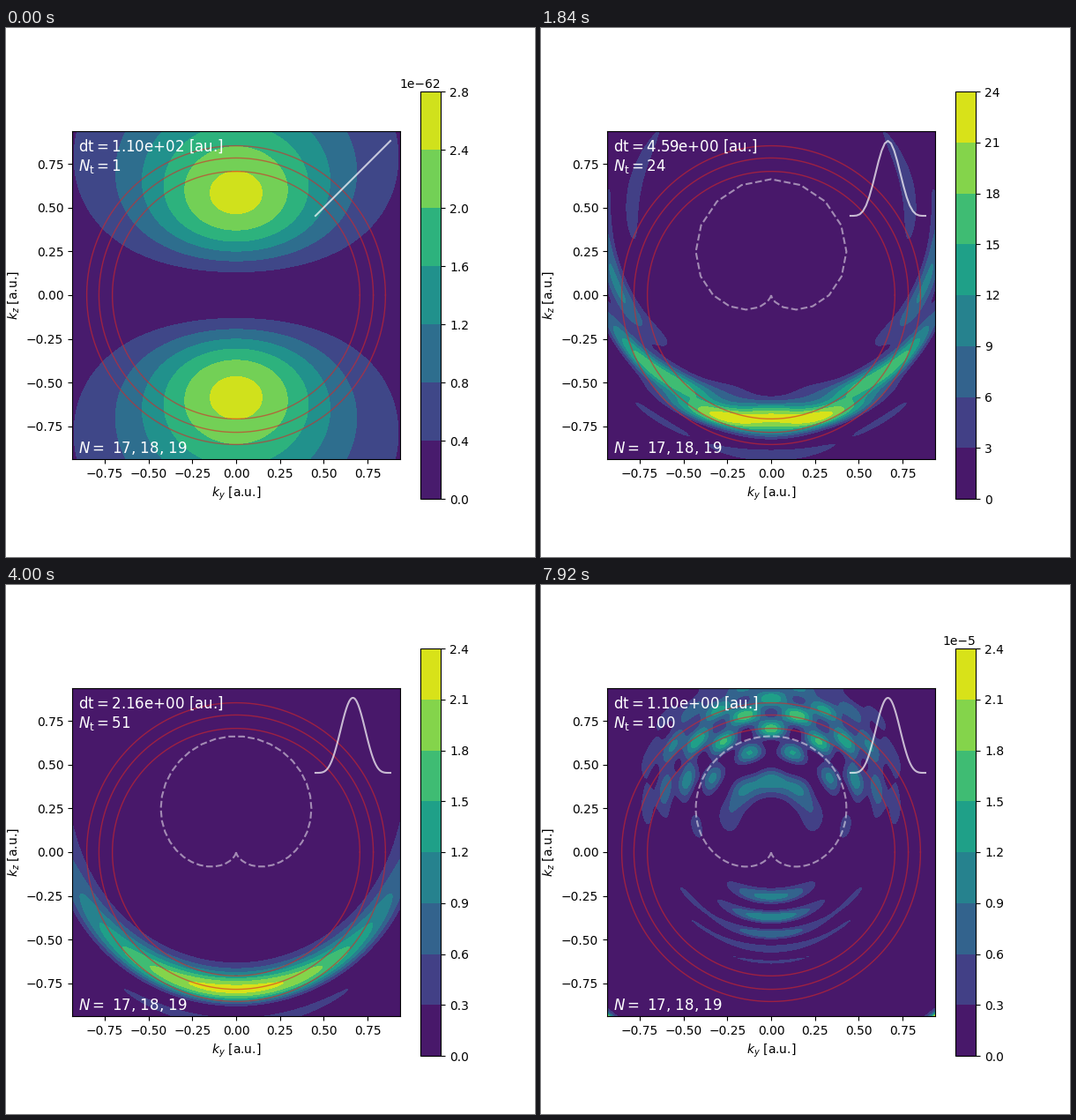
A matplotlib script that plays this animation: 600x600 px, repeating every 8000 ms.

```python
import numpy as np
import matplotlib.pyplot as plt
from matplotlib.animation import FuncAnimation

# Photoelectron momentum map from a one-cycle circular pulse (atomic units),
# integrated in time with a growing number of Simpson intervals.
OMEGA = 0.057
IP = 0.5
A0 = np.sqrt(1e14 / 3.5095e16 / 2) / OMEGA
UP = A0**2 / 2
PERIOD = 2 * np.pi / OMEGA
K_MAX = np.sqrt(2) * A0
ORDERS = (17, 18, 19)
STEPS = 100

k = np.linspace(-K_MAX, K_MAX, 200)
ky, kz = np.meshgrid(k, k)
ground_state = 2 * np.sqrt(2) / np.pi / (ky**2 + kz**2 + 1)**2


def simpson_weights(n):
    """Simpson weights for n intervals, with a three-point end rule if n is odd."""
    if n == 1:
        return np.array([0.5, 0.5])
    w = np.zeros(n + 1)
    last = n - n % 2
    w[:last + 1:2] = 2 / 3
    w[1:last:2] = 4 / 3
    w[[0, last]] = 1 / 3
    if n % 2:
        w[-3:] += [-1 / 12, 2 / 3, 5 / 12]
    return w


def vector_potential(n):
    theta = np.linspace(0, 2 * np.pi, n + 1)
    envelope = np.sin(theta / 2)**2
    return (theta, envelope,
            A0 * envelope * np.sin(theta), A0 * envelope * np.cos(theta))


def momentum_map(n):
    theta, _, ay, az = vector_potential(n)
    t = theta / OMEGA
    sin, cos, sin2 = np.sin(theta), np.cos(theta), np.sin(2 * theta)
    # Time integrals of Ay, Az and A^2
    int_y = A0 / (2 * OMEGA) * (1 - cos - sin**2 / 2)
    int_z = A0 / (2 * OMEGA) * (sin - theta / 2 - sin2 / 4)
    int_sq = A0**2 / (4 * OMEGA) * (1.5 * theta - 2 * sin + sin2 / 4)

    # The phase separates into a ky part, a kz part and a common part
    kinetic = np.outer(k**2 / 2, t)
    wave_y = np.exp(1j * (kinetic + np.outer(k, int_y)))
    wave_z = np.exp(1j * (kinetic + np.outer(k, int_z)))
    wave_z *= simpson_weights(n) * PERIOD / n * np.exp(1j * (IP * t + int_sq / 2))
    amplitude = kz * ((wave_z * az) @ wave_y.T) + ky * ((wave_z * ay) @ wave_y.T)
    return np.abs(ground_state * amplitude)**2


fig = plt.figure(figsize=(6, 6), dpi=100)
ax = fig.add_axes([0.125, 0.11, 0.62, 0.77])
ax.set_aspect("equal")
ax.set_xlim(-K_MAX, K_MAX)
ax.set_ylim(-K_MAX, K_MAX)
ax.set_xlabel("$k_y$ [a.u.]")
ax.set_ylabel("$k_z$ [a.u.]")

angle = np.linspace(0, 2 * np.pi, 400)
for order in ORDERS:
    radius = np.sqrt(2 * (order * OMEGA - IP - UP))
    ax.plot(radius * np.cos(angle), radius * np.sin(angle),
            color="tab:red", lw=1, alpha=0.6)
path, = ax.plot([], [], "w--", alpha=0.5)
pulse, = ax.plot([], [], "w-", alpha=0.7)

text_style = dict(transform=ax.transAxes, color="white", fontsize=12)
info = ax.text(0.02, 0.98, "", va="top", **text_style)
ax.text(0.02, 0.02, "$N=$ " + ", ".join(map(str, ORDERS)), **text_style)


def draw(frame):
    n = frame + 1
    for old in list(ax.collections) + fig.axes[1:]:
        old.remove()
    filled = ax.contourf(k, k, momentum_map(n))
    cax = fig.add_axes([0.78375, 0.11, 0.0385, 0.77])
    fig.colorbar(filled, cax=cax)

    _, envelope, ay, az = vector_potential(n)
    path.set_data(-ay, -az)
    intensity = envelope**2
    low, high = 0.453, 0.881
    pulse.set_data(np.linspace(low, high, n + 1),
                   low + (high - low) * intensity / intensity.max())
    info.set_text(f"dt$=${PERIOD / n:.2e} [au.]\n$N_{{\\rm t}}=${n}")
    return []


anim = FuncAnimation(fig, draw, frames=STEPS, interval=80, repeat=True)
plt.show()
```
